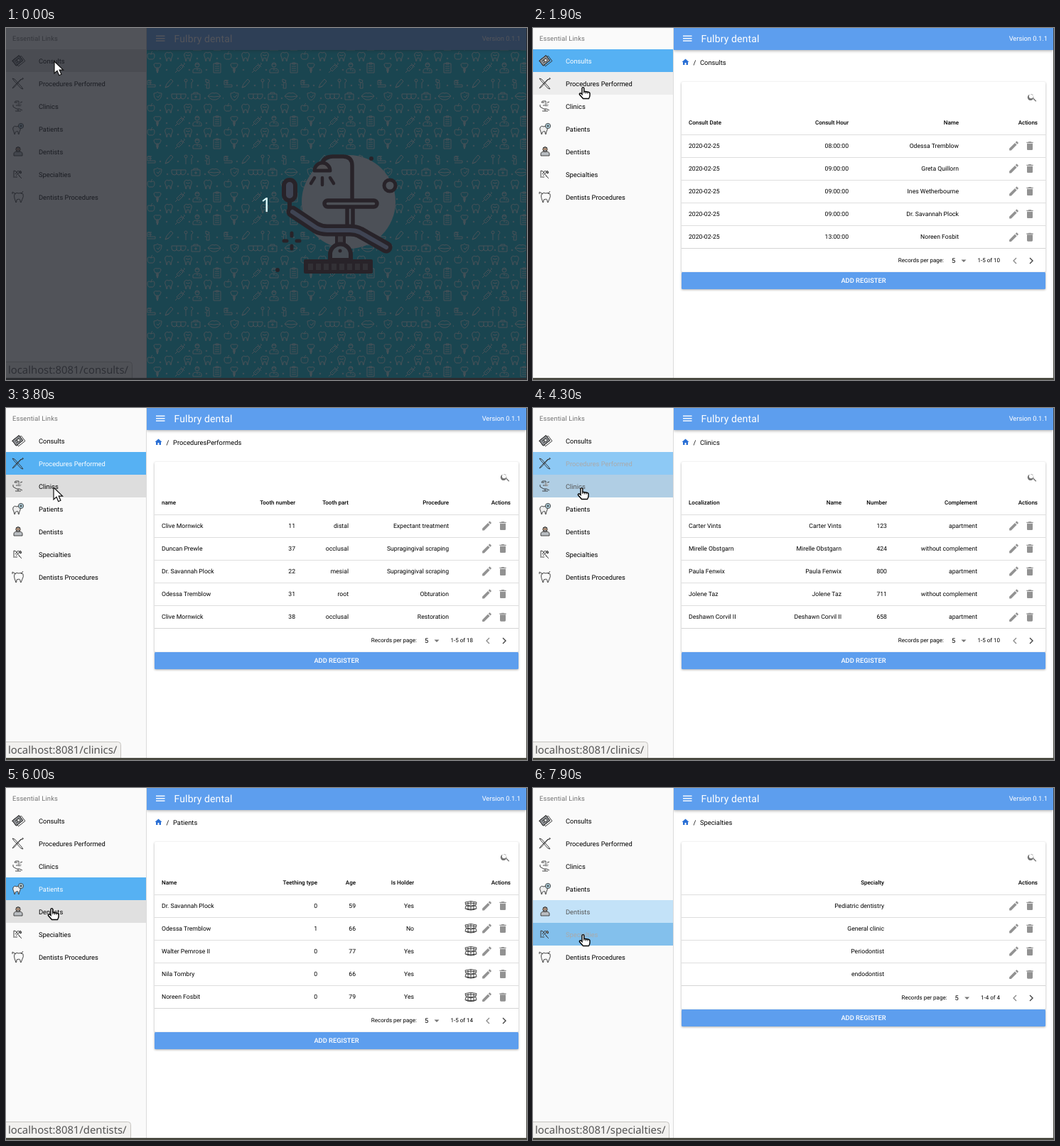
These frames come from a looping animation (733 by 496 pixels, 8000 ms). An HTML page:

```html
<!DOCTYPE html>
<html lang="en">
<head>
<meta charset="utf-8">
<title>Clinic admin</title>
<style>
html, body { margin: 0; width: 100%; height: 100%; overflow: hidden; background: #fff; }
svg { display: block; width: 733px; height: 496px; }
text { font-family: Roboto, sans-serif; text-rendering: geometricPrecision; white-space: pre; }
.noto { font-family: "Noto Sans", sans-serif; }
.line { fill: none; stroke: #333; stroke-width: .9; stroke-linejoin: round; }
.print { fill: none; stroke: #d3f2f5; stroke-width: 1; stroke-linejoin: round; }
.brown { stroke: #3f2121; stroke-linecap: round; stroke-linejoin: round; }
.bar { filter: drop-shadow(0 1px 2px rgba(0,0,0,.35)); }
.card { filter: drop-shadow(0 1px 1.5px rgba(0,0,0,.32)); }
</style>
</head>
<body>
<svg id="stage" viewBox="0 0 733 496" xmlns="http://www.w3.org/2000/svg"></svg>
<script>
const LOOP = 8000, STEP = 100;
const BLUE = '#5d9eee';

// ---- drawing helpers ----
const text = (x, y, str, size = 8.67, opt = '') =>
  `<text x="${x}" y="${y + size * .36}" font-size="${size}" ${opt}>${str}</text>`;
const END = 'text-anchor="end"', MID = 'text-anchor="middle"', MEDIUM = 'font-weight="500"';
const box = (x, y, w, h, fill, opt = '') =>
  `<rect x="${x}" y="${y}" width="${w}" height="${h}" fill="${fill}" ${opt}/>`;
const at = (x, y, body, opt = '') => `<g transform="translate(${x} ${y})" ${opt}>${body}</g>`;
const path = (d, opt = '') => `<path d="${d}" ${opt}/>`;
const dot = (x, y, r, opt = '') => `<circle cx="${x}" cy="${y}" r="${r}" ${opt}/>`;
const material = (x, y, size, fill, d) =>
  `<path transform="translate(${x - size / 2} ${y - size / 2}) scale(${size / 24})" fill="${fill}" d="${d}"/>`;

// ---- home wallpaper ----
const TOOTH = 'M-5-4q2-3 5-1 3-2 5 1 1 3-1 6l-1 5q-1 0-1-3 0-2-2-2t-2 2q0 3-1 3l-1-5q-2-3-1-6z';
const glyph = {
  tooth: TOOTH,
  crown: TOOTH + 'M-3-2q3 2 6 0',
  apple: 'M0-3q-5-3-5 2 0 6 5 5 5 1 5-5 0-5-5-2zM0-3q0-3 2-4',
  implant: 'M-5-4q0-3 5-2 5-1 5 2l-2 4h-6zM-2 2h4M-2 4h4M-1 0l.5 7h1l.5-7',
  syringe: 'M-7 7l3-3M-5 2l6-6 3 3-6 6zM1-6l5 5M4-3l3-3M5-7l2 2M-2 1l1 1M0-1l1 1',
  doctor: 'M-3-4a3 3 0 1 1 6 0 3 3 0 1 1-6 0zM-3-5h6M-6 7v-3q0-3 6-3t6 3v3zM0 1v3M2 4h2',
  clipboard: 'M-5-6h10v13h-10zM-2-7h4v2h-4zM-3-2h6M-3 1h6M-3 4h6',
  brush: 'M-5 5h11M-5 2h11v3M-5 2v-6h4v6M-4-4h5M-4-1h5',
  tube: 'M-5 6l2-5 6-7 3 3-6 7zM-5 6l5-2',
  tools: 'M-4-6a2 2 0 1 1 0 4 2 2 0 1 1 0-4zM-4-2v9M3-6q3 0 3 3l-2 2v8',
  drill: 'M-3-6l5 2-1 3-4-1zM-1-1l-1 8h4v-8M-4 1l1 2',
  teeth: 'M-10-3h20v3q-1 4-4 4t-3-3q0 3-3 3t-3-3q0 3-3 3-4 0-4-4zM-3-3v4M3-3v4',
  kit: 'M-6-3h12v8h-12zM-3-3v-2h6v2M0-1v4M-2 1h4',
  lips: 'M-9 0q5-6 9-4 4-2 9 4-5 6-9 5-4 1-9-5zM-9 0q9 2 18 0',
  shield: 'M-6-4q4 0 5-2 1 2 6 2 0 8-6 10-5-2-5-10zM-2 0l2 2 3-4'
};
const fruit = 'apple 6 tooth 31 crown 58 tooth 86';
const staff = 'implant 15 syringe 47 doctor 71 clipboard 99';
const rows = {
  9: fruit, 27: staff, 43: fruit, 59: staff,
  81: 'brush 6 tube 31 tools 59 drill 86',
  99: 'shield 16 teeth 45 kit 69 lips 95'
};
const tile = Object.entries(rows).map(([y, row]) => {
  const words = row.split(' ');
  return words.map((w, i) => i % 2 ? '' : at(words[i + 1], y, path(glyph[w])) +
    dot(+words[i + 1] + 13, +y + 3, .8)).join('');
}).join('');

const chair =
  dot(482, 245, 66, 'fill="#e4eef0"') +
  `<g class="brown" stroke-width="6" fill="none">
    ${path('M445 190Q448 181 460 181H474Q487 181 487 194V242M480 252V280M488 252V280', 'stroke-width="5.5"')}
    ${path('M434 201a11 11 0 0 1 22 0z', 'fill="#e8dcd0" stroke-width="5"')}
    ${path('M434 211l-5 8M445 211v10M456 211l5 8', 'stroke-width="4.5"')}
    <rect x="448" y="243" width="74" height="9" rx="4.5" fill="#e9eeee" stroke-width="5.5"/>
    ${box(465, 290, 11, 14, '#a09490', 'stroke-width="4"')}
    ${path('M399 244V262')}
    ${path('M403 259L436 281Q443 285 452 285H484Q492 285 498 288L535 309', 'stroke-width="17"')}
    ${path('M403 259L436 281Q443 285 452 285H484Q492 285 498 288L535 309', 'stroke-width="6" style="stroke:#a9b9df"')}
    <rect x="391" y="214" width="16" height="29" rx="8" fill="#a9b9df"/>
    ${path('M456 327V319a14.5 14.5 0 0 1 29 0V327z', 'fill="#c9dade"')}
    ${dot(540, 222, 8, 'fill="#e4eef0" stroke-width="5"')}
    ${path('M402 289v4M402 307v4M391 300h4M409 300h4', 'stroke-width="5"')}
  </g>` +
  [[470, 314, 2.5], [514, 184, 3], [382, 341, 3]].map(c => dot(...c, 'fill="#3f2121"')).join('') +
  box(419, 326, 97, 20, '#3f2121', 'rx="2"') +
  [...Array(8)].map((_, i) => box(425 + i * 11, 332, 7, 9, '#6d5a56')).join('');

const home = box(198, 30, 534, 463, '#00bdd1') + box(198, 30, 534, 463, 'url(#print)') + chair;

// ---- table pages ----
const EDIT = 'M3 17.25V21h3.75L17.81 9.94l-3.75-3.75L3 17.25zM20.71 7.04c.39-.39.39-1.02 0-1.41l-2.34-2.34c-.39-.39-1.02-.39-1.41 0l-1.83 1.83 3.75 3.75 1.83-1.83z';
const TRASH = 'M6 19c0 1.1.9 2 2 2h8c1.1 0 2-.9 2-2V7H6v12zM19 4h-3.5l-1-1h-5l-1 1H5v2h14V4z';
const SEARCH = 'M15.5 14h-.79l-.28-.27A6.5 6.5 0 1 0 14 14.7l.27.28v.79l5 5L20.49 19l-5-5zm-6 0a4.5 4.5 0 1 1 0-9 4.5 4.5 0 0 1 0 9z';
const HOUSE = 'M10 20v-6h4v6h5v-8h3L12 3 2 12h3v8z';
const JAW = 'M-8-5q8-3 16 0l-1 4q-7 2-14 0zM-7 0q7 2 14 0l1 4q-8 4-16 0zM-7-3q7-2 14 0M-7 4q7 2 14 0M-4-5v4M0-6v5M4-5v4M-4 1v5M0 1v5M4 1v5';

const pages = [
  { title: 'Consults', total: 10, cols: { 'Consult Date': 219, 'Consult Hour': 444, Name: 599 }, rows: [
    '2020-02-25|08:00:00|Odessa Tremblow', '2020-02-25|09:00:00|Greta Quillorn',
    '2020-02-25|09:00:00|Ines Wetherbourne', '2020-02-25|09:00:00|Dr. Savannah Plock',
    '2020-02-25|13:00:00|Noreen Fosbit'] },
  { title: 'ProceduresPerformeds', total: 18,
    cols: { name: 219, 'Tooth number': 407, 'Tooth part': 482, Procedure: 623 }, rows: [
    'Clive Mornwick|11|distal|Expectant treatment', 'Duncan Prewle|37|occlusal|Supragingival scraping',
    'Dr. Savannah Plock|22|mesial|Supragingival scraping', 'Odessa Tremblow|31|root|Obturation',
    'Clive Mornwick|38|occlusal|Restoration'] },
  { title: 'Clinics', total: 10, cols: { Localization: 219, Name: 434, Number: 498, Complement: 625 }, rows: [
    'Carter Vints|Carter Vints|123|apartment', 'Mirelle Obstgarn|Mirelle Obstgarn|424|without complement',
    'Paula Fenwix|Paula Fenwix|800|apartment', 'Jolene Taz|Jolene Taz|711|without complement',
    'Deshawn Corvil II|Deshawn Corvil II|658|apartment'] },
  { title: 'Patients', total: 14, jaw: true,
    cols: { Name: 219, 'Teething type': 438, Age: 492, 'Is Holder': 574 }, rows: [
    'Dr. Savannah Plock|0|59|Yes', 'Odessa Tremblow|1|66|No', 'Walter Pemrose II|0|77|Yes',
    'Nila Tombry|0|66|Yes', 'Noreen Fosbit|0|79|Yes'] },
  { title: 'Dentists', total: 10, cols: { Name: 219, Specialty: 574 }, rows: [
    'Carter Vints|General clinic', 'Mirelle Obstgarn|Periodontist', 'Paula Fenwix|endodontist',
    'Jolene Taz|Pediatric dentistry', 'Deshawn Corvil II|General clinic'] },
  { title: 'Specialties', total: 4, cols: { Specialty: 494 }, rows: [
    'Pediatric dentistry', 'General clinic', 'Periodontist', 'endodontist'] }
];

function drawPage({ title, total, cols, rows, jaw }) {
  const xs = Object.values(cols), n = rows.length, foot = 168 + n * 32, shift = total < 10 ? 4.6 : 0;
  const side = x => x === 219 ? '' : END;
  const head = Object.keys(cols).map((c, i) => text(xs[i], 133, c, 8, side(xs[i]) + MEDIUM)).join('');
  const body = rows.map((row, r) => {
    const y = 166 + r * 32, iy = r > 2 && r === n - 1 ? y + .7 : y;
    return box(209, y - 16, 512, 1, '#dedede') +
      row.split('|').map((v, i) => text(xs[i], y, v, 8.67, side(xs[i]))).join('') +
      (jaw ? at(654, iy, path(JAW), 'class="line"') : '') +
      material(676.5, iy, 17, '#929292', EDIT) + material(699, iy, 16, '#929292', TRASH);
  }).join('');
  return box(198, 30, 534, 463, '#fff') +
    material(214.5, 48, 12, '#2a6fd4', HOUSE) + text(225.5, 48.5, '/', 9.33) + text(235, 48.5, title, 9.33) +
    box(209, 76, 512, foot - 60, '#fff', 'rx="2" class="card"') +
    material(702.5, 98, 16, '#757575', SEARCH) +
    head + text(710, 133, 'Actions', 8, END + MEDIUM) + body +
    box(209, foot - 18, 512, 1, '#d4d4d4') +
    text(578 + shift, foot - .5, 'Records per page:', 8, END) +
    text(589 + shift, foot - .5, '5', 9.33) +
    path(`M${602.5 + shift} ${foot - 1.5}h7l-3.5 3.5z`, 'fill="#757575"') +
    text(657, foot - .5, `1-${n} of ${total}`, 8, END) +
    path(`M680 ${foot - 4}l-4 4 4 4`, 'fill="none" stroke="#888" stroke-width="1.3"') +
    path(`M699 ${foot - 4}l4 4-4 4`, 'fill="none" stroke="#444" stroke-width="1.4"') +
    box(209, foot + 16, 512, 24, BLUE, 'rx="1.5" class="card"') +
    text(465, foot + 28, 'ADD REGISTER', 9.33, MID + MEDIUM + ' fill="#fff"');
}

// ---- sidebar ----
const links = ['Consults', 'Procedures Performed', 'Clinics', 'Patients', 'Dentists', 'Specialties', 'Dentists Procedures'];
const icons = [
  `<g transform="rotate(-38)">${box(-6.5, -5, 12, 9, '#8f9296')}${path('M-6.5-5h12v9h-12zM-4.5 4v2.5h12v-9h-2M-4-2h7M-4 1h7')}${dot(1, 0, 2.2, 'fill="#ddd"')}</g>`,
  path('M-8-7l3 1 10 11 2 3-3-1L-6-4zM7-8l-3 3L-5 5l-3 2 2-3L4-6M5-5l3-2'),
  path('M-5-5q1-3 3-2h3v7M-7-2v3l5 3h4l4 2M0 4v3M-4 7h8M-3-1h7M3-5l3-1M-5-5h4') + dot(2, -2, 3, 'fill="#bbb" stroke="none" opacity=".5"'),
  at(-2, 2, path('M-5-4q2-3 5-1 3-2 5 1 1 3-1 6l-1 4q-1 0-1-3t-4 0q0 3-1 3l-1-4q-2-3-1-6z', 'fill="#eee"')) + dot(4, -4, 3.6, 'fill="#b9dbe8"') + path('M2-4h4M4-6v4'),
  path('M-6 6v-3q0-3 6-3t6 3v3z', 'fill="#b9bdc1"') + dot(0, -3, 3.2, 'fill="#d0a98c"') + path('M-3-5q3-3 6 0zM-2-2h4v2h-4z', 'fill="#ddd"'),
  path('M-6-5l3 1 6 8M-6-5v10M-4 0l4-5 2 2-5 5M2-5l3 3-2 1M1 2l4 4M-5 4h4') + dot(3, -3, 1.5, 'fill="#999"'),
  at(1, 1, path('M-6-5q3-3 6-1 3-2 6 1 1 4-1 7l-2 5q-1 0-1-3t-5-1q0 4-1 4l-2-6q-1-3 0-6z')) + path('M-8-7l5 3M-8-7v3M4-4l3-4')
];
const sidebar = box(0, 0, 197, 493, '#fafafa') + box(197, 0, 1, 493, '#dcdcdc') +
  text(9, 14.5, 'Essential Links', 9.33, 'fill="#757575" letter-spacing=".13"') +
  links.map((name, i) => {
    const y = 46 + i * 32;
    return box(0, y - 16, 197, 32, '#fafafa', `id="row${i}"`) + at(17, y, icons[i], 'class="line"') +
      text(46, y + .5, name, 9.33, `id="link${i}"`);
  }).join('');

const header = box(198, 0, 534, 31, BLUE, 'class="bar"') +
  [10.6, 14, 17.4].map(y => box(211, y, 12.5, 1.4, '#fff')).join('') +
  text(236.5, 14.5, 'Fulbry dental', 14, 'fill="#fff" letter-spacing=".14"') +
  text(724, 14.5, 'Version 0.1.1', 9.33, END + ' fill="#fff"');

const ARROW = 'M0 0V17l4-3.7 2.7 6.4 3.2-1.4-2.7-6.2h5.3z';
const HAND = 'M4.5 10V2a1.4 1.4 0 0 1 2.8 0v4.3l6 .9q2.2.4 2.2 2.3V12q0 2-1.5 4.5H6L1 10.8q-.6-1.6.8-2 1.2 0 2.7 1.6z';

const $ = id => document.getElementById(id);
$('stage').innerHTML =
  `<defs><pattern id="print" x="198" y="104" width="108" height="107" patternUnits="userSpaceOnUse">
    <g class="print">${tile}</g></pattern></defs>` +
  [home, ...pages.map(drawPage)].map((p, i) => `<g id="page${i}">${p}</g>`).join('') +
  header + sidebar +
  `<g id="status">${path('', 'id="bubble" fill="#f2f1ef" stroke="#c6c4c0"')}
    ${text(3, 482, '', 14.8, 'id="url" class="noto" fill="#555"')}</g>` +
  box(732, 0, 1, 496, '#44443e') + box(0, 493, 733, 3, '#4a4a42') +
  `<g id="dim">${box(0, 0, 733, 496, 'rgba(34,36,44,.78)')}
    ${text(366, 248.5, '1', 28, MID + ' class="noto" fill="#dcffff"')}</g>` +
  `<g id="cursor">
    ${path(ARROW, 'id="arrow" fill="#fff" stroke="#111" stroke-width="1.2"')}
    ${at(-4.5, 0, path(HAND, 'fill="#fff" stroke="#000" stroke-width="1.4"') +
      path('M9.8 7v2.5M12.4 7.4v2.3M7.3 6v3', 'stroke="#000" fill="none"'), 'id="hand"')}</g>`;

// ---- timeline ----
const clicks = [1400, 2300, 4200, 5400, 6500, 7700];
const hovers = [-300, 1800, 3500, 4800, 5800, 7100];
// start, end, address, bubble width
const addresses = [
  [0, 1200, 'consults/', 178], [2000, 3400, 'procedures-perf…', 241], [3500, 4400, 'clinics/', 162],
  [4900, 5600, 'patients/', 177], [5900, 6800, 'dentists/', 176], [7200, 8000, 'specialties/', 192]
];
// time, x, y of the pointer tip
const moves = [
  [0, 68, 47], [1500, 68, 47], [1900, 69, 83], [2900, 69, 83], [3500, 67, 112], [4500, 67, 112],
  [4900, 63, 147], [5600, 63, 147], [6000, 63, 169], [6800, 63, 169], [7200, 69, 206], [8000, 69, 206]
];
const clamp = v => Math.max(0, Math.min(1, v));
const mix = (a, b, k) => a.map((v, i) => v + (b[i] - v) * k);
const rgb = c => `rgb(${c.map(Math.round)})`;
const show = (id, on) => $(id).style.display = on ? '' : 'none';
const PLAIN = [250, 250, 250], HOVER = [221, 221, 221], ACTIVE = [86, 177, 243];

function pointer(t) {
  const i = moves.findIndex(m => m[0] > t), a = moves[i - 1], b = moves[i];
  const k = (t - a[0]) / (b[0] - a[0]), e = k * k * (3 - 2 * k);
  return mix(a, b, e).slice(1);
}

function render(now) {
  const t = Math.floor(now % LOOP / STEP) * STEP;
  const page = clicks.filter(c => t >= c + 100).length;
  for (let i = 0; i <= pages.length; i++) show('page' + i, i === page);

  const [x, y] = pointer(t);
  $('cursor').setAttribute('transform', `translate(${x} ${y})`);
  const isArrow = t < 1200 || t >= 2700 && t < 3900;
  show('arrow', isArrow);
  show('hand', !isArrow);

  const over = Math.floor((y - 30) / 32);
  clicks.forEach((start, i) => {
    const on = clamp((t - start) / 300) - clamp((t - (clicks[i + 1] ?? LOOP)) / 300);
    const hover = i === over ? clamp((t - hovers[i]) / 220) : 0;
    $('row' + i).setAttribute('fill', rgb(mix(mix(PLAIN, HOVER, hover), ACTIVE, on)));
    $('link' + i).setAttribute('fill', rgb(mix([0, 0, 0], [255, 255, 255], on)));
  });

  const link = addresses.find(a => t >= a[0] && t < a[1]);
  show('status', link);
  if (link) {
    $('url').textContent = 'localhost:8081/' + link[2];
    $('bubble').setAttribute('d', `M-1 470.5H${link[3] - 4.5}q4 0 4 4V494H-1z`);
  }
  $('dim').style.opacity = t < 300 ? 1 : clamp((500 - t) / 300);
}

function tick() {
  render(performance.now());
  requestAnimationFrame(tick);
}
tick();
</script>
</body>
</html>
```
